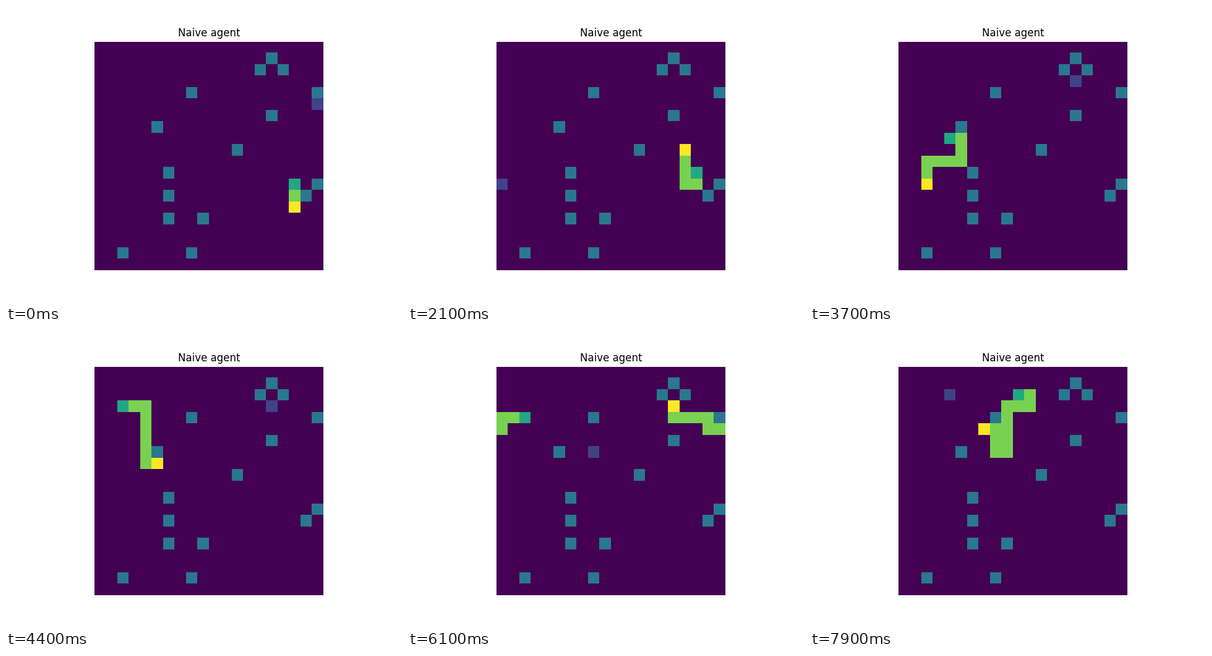
These frames come from a looping animation (640x480 px, 8000 ms). A matplotlib script:

```python
import numpy as np
import matplotlib.pyplot as plt
from matplotlib.animation import FuncAnimation

SIZE = 20
FRAMES = 80
FOOD, WALL, HEAD, BODY, TAIL = 1, 2, 3, 4, 5

WALLS = [(1, 15), (2, 14), (2, 16), (4, 8), (4, 19), (6, 15), (7, 5), (9, 12),
         (11, 6), (12, 19), (13, 6), (13, 18), (15, 6), (15, 9), (18, 2), (18, 8)]
FOODS = [(5, 19), (12, 16), (12, 0), (13, 1), (10, 5),
         (3, 15), (4, 0), (7, 8), (3, 11), (2, 4)]
START = [(14, 17), (13, 17), (12, 17)]
ROUTE = ("U7 R2 D1 L1 D1 L2 D5 R1 U1 R3 D1 R1 D1 R1 U3 R3 U2 L1 U5 L9 "
         "D1 R3 D1 R2 U1 R7 D1 R1 D2 R1 U4 R2 U1 L1")
STEP = {"U": (-1, 0), "D": (1, 0), "L": (0, -1), "R": (0, 1)}


def walk():
    """Cells visited by the head, wrapping around the board edges."""
    path = list(START)
    for leg in ROUTE.split():
        dr, dc = STEP[leg[0]]
        for _ in range(int(leg[1:])):
            r, c = path[-1]
            path.append(((r + dr) % SIZE, (c + dc) % SIZE))
    return path


PATH = walk()


def board(step):
    # a meal lengthens the snake and moves the food one step later
    eaten = 0
    for cell in PATH[len(START) - 1:step + len(START) - 1]:
        if cell == FOODS[eaten]:
            eaten += 1
    end = step + len(START)
    snake = PATH[max(0, end - 4 - eaten):end]

    grid = np.zeros((SIZE, SIZE))
    for cell in WALLS:
        grid[cell] = WALL
    grid[FOODS[eaten]] = FOOD
    for cell in snake:
        grid[cell] = BODY
    grid[snake[0]] = TAIL
    grid[snake[-1]] = HEAD
    return grid


fig, ax = plt.subplots(figsize=(6.4, 4.8), dpi=100)
image = ax.imshow(board(0), cmap="viridis", vmin=0, vmax=5, interpolation="nearest")
ax.set_title("Naive agent")
ax.axis("off")


def update(step):
    image.set_data(board(step))
    return [image]


anim = FuncAnimation(fig, update, frames=FRAMES, interval=100,
                     repeat=True, repeat_delay=0, blit=False)
plt.show()
```
